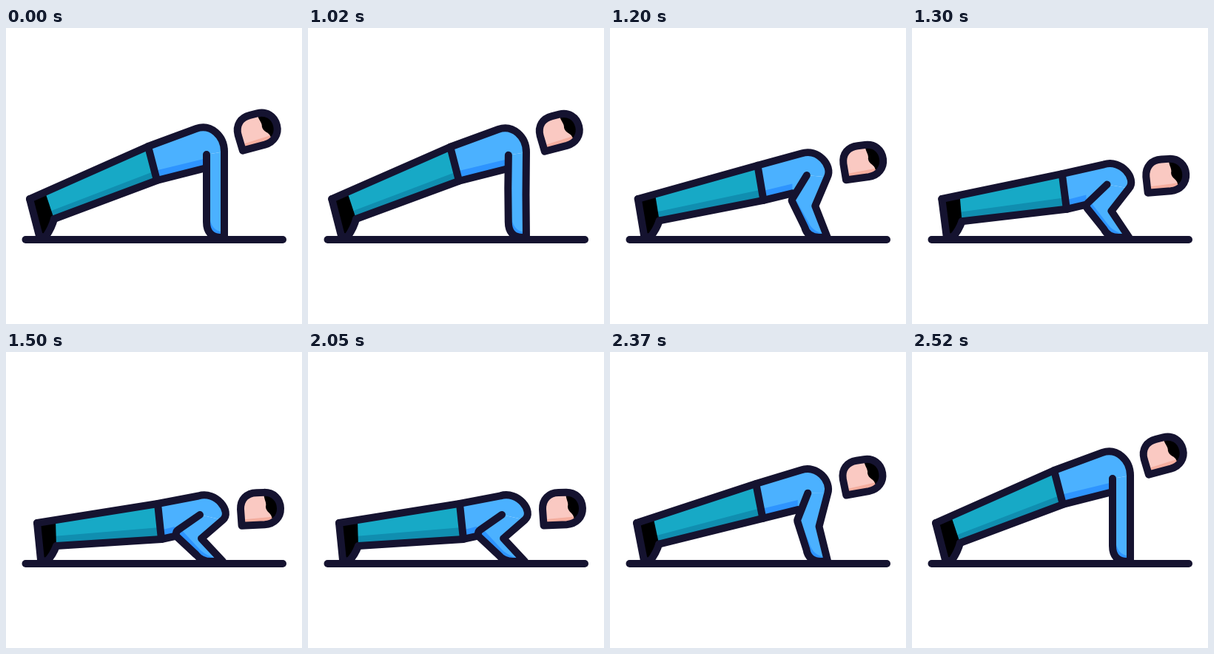
Animation of 400x400 px, one loop 2.55 s. Source, as an HTML page with a canvas:

```html
<!DOCTYPE html>
<html lang="en">
<head>
<meta charset="utf-8">
<title>Push-up</title>
<style>
html, body { margin: 0; width: 100%; height: 100%; overflow: hidden; background: #fff; }
canvas { display: block; width: 400px; height: 400px; }
</style>
</head>
<body>
<canvas id="stage"></canvas>
<script>
const canvas = document.getElementById('stage');
const ctx = canvas.getContext('2d');
const ratio = window.devicePixelRatio || 1;
canvas.width = canvas.height = 400 * ratio;

const LOOP = 2550, DOWN = 1018, UP = 2043, STEP = 25, STEPS = 20;
const ink = '#151330', teal = '#17a9c6', tealShade = '#108eb0';
const blue = '#4bb1ff', blueShade = '#2e94ff';
const skin = '#fac9c2', skinShade = '#f5ae9f';

// Each joint: x, y with straight arms, then x, y when lowered
const joints = {
  heel: [32, 231, 42, 231],
  toe: [45, 281, 47, 281],
  sole: [53, 283, 55, 283],
  ankle: [65, 258, 68, 262],
  cuffTop: [53, 222, 67, 227],
  waist: [192, 160, 205, 205],
  hip: [204, 206, 210, 253],
  neck: [257, 136, 260, 194.5],
  neckPull: [277, 129, 284, 187],
  armPull: [295, 146, 306, 216],
  arm: [295, 167, 293, 227],
  bend: [295, 225, 264, 252],
  palm: [295, 283, 293, 283],
  pit: [271, 171, 262, 220],
  elbow: [271, 216, 226, 245],
  wrist: [271, 262, 257, 274],
  wristPull: [271, 276, 261, 279],
  palmPull: [278, 283, 267, 283],
  palmBack: [290, 283, 277, 283],
  belly: [271, 189, 228, 249]
};

const mix = (a, b, p) => a + (b - a) * p;

// Eased travel: slow start, long settle
function ease(u) {
  if (u <= 0) return 0;
  if (u >= 1) return 1;
  let lo = 0, hi = 1, s = 0.5;
  for (let i = 0; i < 24; i++) {
    s = (lo + hi) / 2;
    const r = 1 - s;
    const x = 3 * 0.222 * s * r * r + 3 * 0.393 * s * s * r + s * s * s;
    if (x < u) lo = s; else hi = s;
  }
  return s * s * (3 - 2 * s);
}

function progress(t, start) {
  const n = Math.floor((t - start) / STEP) + 1;
  return Math.max(0, Math.min(STEPS, n)) / STEPS;
}

const depth = t => ease(t < UP ? progress(t, DOWN) : 1 - progress(t, UP));

function fill(color) {
  ctx.closePath();
  ctx.fillStyle = color;
  ctx.fill();
}

function stroke() {
  ctx.strokeStyle = ink;
  ctx.lineWidth = 10;
  ctx.stroke();
}

function line(...pts) {
  ctx.beginPath();
  for (const q of pts) ctx.lineTo(q[0], q[1]);
}

const curve = (a, b, c) => ctx.bezierCurveTo(a[0], a[1], b[0], b[1], c[0], c[1]);

function drawLegs(j, at) {
  line(j.heel, j.waist, j.hip, j.ankle);
  fill(teal);
  line(at(56, 249, 64, 249), at(202, 193, 208, 237), j.hip, j.ankle);
  fill(tealShade);

  const foot = () => curve(at(62, 270, 64, 273), at(57, 277, 59, 279), j.sole);
  line(j.heel, j.cuffTop, j.ankle);
  foot();
  ctx.lineTo(...j.toe);
  fill('#000');
  line(j.heel, j.toe, j.sole);
  stroke();
  line(j.ankle);
  foot();
  stroke();
}

function drawTorso(j, at) {
  line(j.waist, j.neck);
  curve(j.neckPull, j.armPull, j.arm);
  ctx.lineTo(...j.pit);
  ctx.lineTo(...j.belly);
  ctx.lineTo(...j.hip);
  fill(blue);
  line(at(201, 193, 208, 241), at(271, 176, 228, 236), j.belly, j.hip);
  fill(blueShade);
  line(j.ankle, j.hip, j.belly);
  stroke();
  line(j.waist, j.hip);
  stroke();
}

function drawArm(j, at, p) {
  const outer = () => {
    line(j.pit);
    ctx.arcTo(...j.elbow, ...j.wrist, 0.5 + 6 * p);
    ctx.lineTo(...j.wrist);
    curve(j.wristPull, j.palmPull, j.palmBack);
    ctx.lineTo(...j.palm);
  };
  outer();
  ctx.lineTo(...j.bend);
  ctx.lineTo(...j.arm);
  fill(blue);

  line(j.elbow, j.wrist);
  curve(j.wristPull, j.palmPull, j.palmBack);
  ctx.lineTo(...j.palm);
  ctx.lineTo(...at(294, 276, 289, 281));
  curve(at(283, 275, 275, 276), at(276, 268, 268, 273), at(275, 254, 262, 267));
  ctx.lineTo(...at(271, 220, 234, 237));
  fill(blueShade);

  outer();
  ctx.lineTo(...j.bend);
  ctx.lineTo(...j.arm);
  curve(j.armPull, j.neckPull, j.neck);
  ctx.lineTo(...j.waist);
  ctx.lineTo(...j.heel);
  stroke();
}

function headPath() {
  ctx.beginPath();
  ctx.moveTo(-26, 22);
  ctx.lineTo(-27, 0);
  ctx.bezierCurveTo(-27, -14, -18, -22, -5, -22);
  ctx.lineTo(5, -22);
  ctx.bezierCurveTo(18, -22, 27, -13, 27, 0);
  ctx.bezierCurveTo(27, 12, 18, 21, 5, 21.5);
  ctx.closePath();
}

function drawHead(p) {
  ctx.save();
  ctx.translate(mix(339.8, 344, p), mix(138, 212, p));
  ctx.rotate(mix(-14, -1.5, p) * Math.PI / 180);
  headPath();
  ctx.save();
  ctx.clip();
  ctx.fillStyle = skin;
  ctx.fillRect(-30, -25, 60, 50);
  line([-28, 14], [18, 11], [18, 25], [-28, 25]);
  fill(skinShade);
  line([5, -23], [29, -23], [29, 14], [15, 13]);
  curve([15, 6], [7, 5], [7, -3]);
  curve([9, -9], [4, -13], [5, -23]);
  fill('#000');
  ctx.restore();
  headPath();
  stroke();
  ctx.restore();
}

function draw(t) {
  const p = depth(t);
  const at = (a, b, c, d) => [mix(a, c, p), mix(b, d, p)];
  const j = {};
  for (const k in joints) j[k] = at(...joints[k]);

  ctx.setTransform(ratio, 0, 0, ratio, 0, 0);
  ctx.fillStyle = '#fff';
  ctx.fillRect(0, 0, 400, 400);
  ctx.lineJoin = ctx.lineCap = 'round';
  drawLegs(j, at);
  drawTorso(j, at);
  drawArm(j, at, p);
  drawHead(p);
  line([26.5, 286], [374, 286]);
  stroke();
}

const begin = performance.now();
function tick() {
  draw((performance.now() - begin) % LOOP);
  requestAnimationFrame(tick);
}
tick();
</script>
</body>
</html>
```
